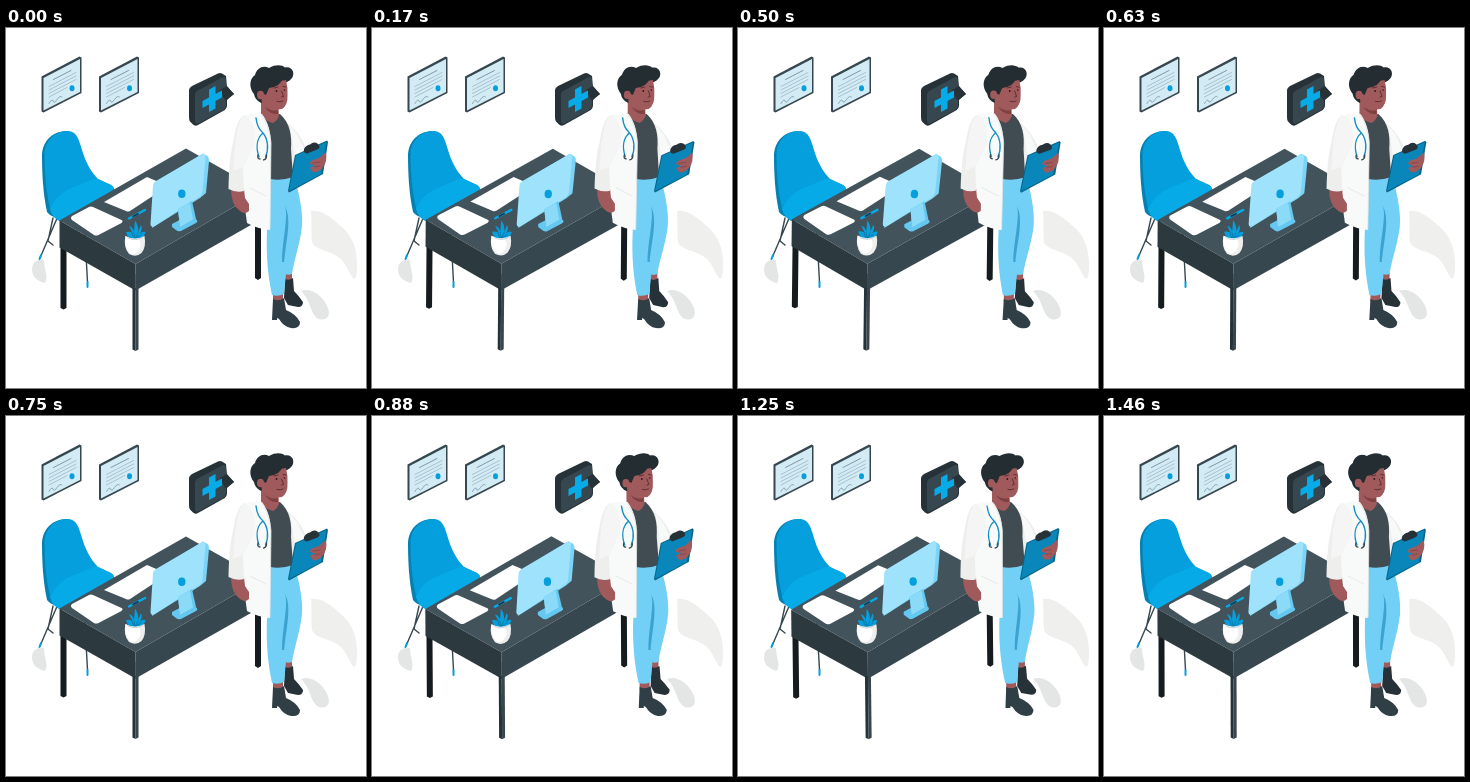
Write an HTML page that moves like this. It is 360 px wide and 360 px high and loops after 1.5 s.

```html
<!DOCTYPE html>
<html lang="en">
<head>
<meta charset="utf-8">
<title>Doctor's office</title>
<style>
  html, body { margin: 0; width: 100%; height: 100%; overflow: hidden; background: #fff; }
  svg { display: block; width: 100%; height: 100%; }
  .ink { fill: #263238; }
  .slate { fill: #37474f; }
  .blue { fill: #049fdc; }
  .pale { fill: #9ee3fb; }
  .skin { fill: #a05a5b; }
  .dusk { fill: #7f4042; }
  .shade { fill: #eeeeed; }
  .coat { fill: #f8faf9; }
  .pants { fill: #72cff5; }
  .line { fill: none; stroke-linecap: round; stroke-linejoin: round; }
</style>
</head>
<body>
<svg viewBox="0 0 360 360">
  <defs>
    <g id="diploma">
      <path class="slate" d="M35.500 48.500L73.500 28.500L75.500 29.500V65L37.500 84.500L35.500 83.500Z"/>
      <path fill="#d3ebf5" d="M37.500 50L74 31V64L37.500 82.500Z"/>
      <path class="line" stroke="#7e98a5" stroke-width="1" d="M47.500 51.500L65 42.500"/>
      <path class="line" stroke="#9db8c4" stroke-width=".8" d="M43 58.500L70 44.500M43 62L70 48M43 65.500L70 51.500M43 69L61 59.500"/>
      <path class="line" stroke="#7e98a5" stroke-width=".8" d="M43 75.500Q46 70 47 73T51 71.500T56 69"/>
      <ellipse class="blue" cx="66" cy="60.300" rx="2.500" ry="3"/>
    </g>
  </defs>

  <!-- floor shadows -->
  <path fill="#efefee" d="M305 183C316 181 327 191 337 200C347 209 351 222 351 236C351 246 350 253 347 250C342 244 340 233 331 228C321 222 309 222 306 214C305 206 306 197 305 183Z"/>
  <g fill="#e4e6e6">
    <path d="M295 263C303 259 317 266 322 280C325 289 320 293 313 291C304 287 306 274 295 263Z"/>
    <path d="M26 241C26 234 32 231 38 232C38 242 43 248 39 255C31 253 26 249 26 241Z"/>
  </g>

  <use href="#diploma"/>
  <use href="#diploma" x="57.500"/>

  <!-- medical sign -->
  <path class="ink" d="M183 62Q183 60 186 58L212 45.500Q214 44.500 216 45.500L220 48L221 59L228 66L221 72V77Q221 81 217 83L192 97Q189 98.500 187 96.500L184 93.500Q183 92 183 89Z"/>
  <path class="slate" d="M189 67Q189 64 192 62.500L216 49.500Q220 47.500 220 52V77Q220 80 217 82L193 95Q189 97 189 93Z"/>
  <path class="ink" d="M214 62L221 58L228 66L219 72Z"/>
  <path fill="#07abe8" d="M203 61.500L209.500 58V66L216 62.500V69.500L209.500 73V80.500L203 84V76.500L196.500 80V73L203 69.500Z"/>

  <!-- chair -->
  <g class="line" stroke="#37474f" stroke-width="1.400">
    <path d="M52 188L34 230M47 190L42 213L47 217M78 190L81.500 254"/>
    <path stroke="#049fdc" stroke-width="2" d="M35 227L33.500 231M81.500 254V259"/>
  </g>
  <path fill="#0580b0" d="M36 126C37 111 49 102 63 103L60 186Q48 193 41 184C37 166 36 145 36 126Z"/>
  <path class="blue" d="M38.500 126C39 112 50 102 63 103C71 104 73 112 76 122C79 132 84 143 92 151L105 157Q110 160 107 165L56 194Q46 191 44 180C40 163 38.500 145 38.500 126Z"/>
  <path fill="#06aae6" d="M44 181Q49 169 61 162L85 152Q88 150 92 151L105 157Q110 160 107 165L56 194Q46 190 44 181Z"/>

  <g id="desk">
    <path fill="#151b1e" d="M54.500 205H60.500V280L57.500 281.500L54.500 280ZM249 190H255V250L252 252L249 250Z"/>
    <path fill="#43535b" d="M53.500 192.500L180 120.500L255.500 163L129.500 236Z"/>
    <path fill="#2c393f" d="M53.500 192.500L129.500 236V262.500L53.500 219.500Z"/>
    <path class="slate" d="M129.500 236L255.500 163V191L129.500 262.500Z"/>
    <path class="slate" d="M129.500 246H132.500V321.500L129.500 323Z"/>
    <path class="ink" d="M126.500 260H129.500V323L126.500 321.500Z"/>

    <!-- papers and pen -->
    <g fill="#fff">
      <path d="M66 188L83 179Q85 178 87 179L115.500 192Q117.500 193 115.500 195L92.500 207Q90 208 88 207L66 192Q64 190 66 188Z"/>
      <path d="M98 174L141 149L162 158L124 183Q122 184 120 183Z"/>
    </g>
    <path class="line" stroke="#06aae6" stroke-width="2.400" d="M123 190.500L139 182"/>
    <path class="line" stroke="#16384d" stroke-width="1.700" d="M127 188.500L132 185.800"/>

    <!-- computer -->
    <path fill="#64c8f0" d="M166 196L183 187L191 192Q192 194 190 195L175 203Q172 204 170 202L166 199Z"/>
    <path fill="#7bd3f5" d="M148 155L197 125.500L201.500 128Q203.500 130 203 133L200 165L194 170L146 200Z"/>
    <path class="pale" d="M147 157Q147.500 155 150 153L195.500 126.500Q200 124.500 199.500 129L196.500 164Q196 167 193.500 169L148.500 198Q144.500 200 144.500 196Z"/>
    <ellipse class="blue" cx="175.800" cy="165.800" rx="3.700" ry="4.300"/>
    <path fill="#64c8f0" d="M172 181L186 173L190 191L174 200Z"/>
    <path fill="#8bdaf8" d="M172 181L184 174.500L187 191.500L174 199Z"/>

    <!-- plant -->
    <path class="blue" d="M120 204Q125 203 127 206L123 198Q127 199 128 204L129 192.500Q133 198 132 204L135 197Q137 200 134 206Q136 203 139.500 204Q138 211 131 213Q122 213 120 204Z"/>
    <path class="line" stroke="#0475a5" stroke-width=".8" d="M128 205L129 211L132 205M126 206L128 211L135 207"/>
    <path class="shade" d="M119.500 208Q129 213 138.500 208Q140.500 219 135.500 225Q130 230 123 226Q117 219 119.500 208Z"/>
    <path fill="#fff" d="M119.500 208Q127 213 133 211Q137 218 131 224Q127 228 123 224Q118 217 119.500 208Z"/>
    <path class="line" stroke="#b9c4c9" stroke-width=".7" d="M122 210Q130 214 137 209"/>
  </g>

  <g id="doctor">
    <!-- legs -->
    <path class="skin" d="M267 262H277V274H267ZM279 242H286V254H279Z"/>
    <path class="ink" d="M279 251Q283 253 287 250L288 263Q293 268 297 274Q297 279 292 279L282 277L278 270Z"/>
    <path fill="#303e45" d="M267 271Q273 274 278 270L280 282Q290 286 294 294Q294 301 285 300Q278 299 273 291L271 290V292H266Z"/>
    <path class="pants" d="M264 148L261 203C260 228 262 248 266 267Q272 269 278 266C280 246 283 220 283 195L277 155Z"/>
    <path fill="#3ba3cf" d="M270 156C277 169 281 178 280 190C279 206 276 218 276 234L279 234L284 190L276 156Z"/>
    <path class="pants" d="M266 148H288C294 168 297 185 296 198C294 216 288 232 286 246Q281 248 278 245C277 225 284 205 282 188C281 176 271 169 268 157Z"/>

    <!-- coat and shirt -->
    <path class="shade" d="M278 93C288 99 296 108 302 125L289 131L287 150L279 121Z"/>
    <path class="coat" d="M284 98L291 106L299 123L289 130Z"/>
    <path fill="#414c52" d="M256 89L274 86C284 95 286 107 285 121L287 149Q276 153 264 151Z"/>
    <path class="skin" d="M255 73H272L273 88Q271 93 267 95Q259 93 255 87Z"/>
    <path class="dusk" d="M259 79Q266 84 272 82V86Q264 87 259 79Z"/>
    <path class="coat" d="M237 88Q247 84 256 86C262 94 264.500 103 265 115L264 202Q252 201 241 195L235 151Z"/>
    <path class="line" stroke="#e3e5e4" stroke-width=".8" d="M256 87C261 95 264 104 265 115L264 201M244 160L260 168"/>
    <path class="skin" d="M225 161H238L239 170L243 176V183Q239 187 234 183Q225 177 225 161Z"/>
    <path class="shade" d="M238 87C231 91 229 104 227 115Q223 130 222.500 161Q230 165 238 163L237 139L248 116Q250 94 238 87Z"/>
    <path fill="#f4f5f4" d="M238 87C232 93 231 105 229 116L227 143L237 139L248 116Q250 94 238 87Z"/>
    <path class="line" stroke="#188fc0" stroke-width="1.400" d="M250 90C251 98 253 101 257 105C262 111 263 121 259.500 129M257 105C251 110 249.500 119 253 129"/>
    <path class="line" stroke="#37474f" stroke-width="1.300" d="M252 127Q251 131 254 131M260.500 127Q261 131 257.500 132"/>

    <!-- clipboard -->
    <path fill="#056488" d="M289 127L321 112.500L322 114L317 146L283 164.500L282 163Z"/>
    <path fill="#0987ba" d="M290 127.500L320.500 114L315 146L283 163Z"/>
    <path class="ink" d="M298 121Q300 117 304 116.500Q308 113 312 116Q316 120 310 122L301 125.500Q297 125 298 121Z"/>
    <path class="skin" d="M320 124Q321.500 134 317 139Q313 145 307 144L304 140Q306 138 310 138L304 136Q304 133 307 132L313 130Z"/>
    <path class="line" stroke="#7f4042" stroke-width=".7" d="M307 135L314 134M309 139L314 138"/>

    <!-- head -->
    <path fill="#232d32" d="M248 66C243 60 243 51 249 47C251 40 257 37 263 40C270 36 276 37 279 39.500C287 38 289 46 286 50C283 54 279 55 276 55L262 72L255 75Q249 72 248 66Z"/>
    <path class="skin" d="M260 57Q268 59 274 53L280 52Q282 60 281.500 67Q282 77 276 81Q266 83 256 76L255 66Z"/>
    <path fill="#232d32" d="M254 54L277 50Q274 59 263 60L260 67L256 65Z"/>
    <ellipse class="skin" cx="254.500" cy="67" rx="3.500" ry="4.200"/>
    <circle fill="#2a1b1d" cx="270.500" cy="63" r=".9"/>
    <circle fill="#2a1b1d" cx="278.500" cy="62" r=".8"/>
    <path class="line" stroke="#4f2629" stroke-width=".8" d="M268 60L272 59M277 58.500L280 59M275.500 63L277.500 68.500L275.500 69M271 73.500Q274 74.500 277 73"/>
  </g>
</svg>
<script>
  const LOOP = 1500;
  // Each group turns about the middle of its own box
  const groups = [
    { el: document.getElementById("desk"), x: 155, y: 222 },
    { el: document.getElementById("doctor"), x: 272, y: 168 }
  ];

  // Linear sway: 0 -> 1 -> -1 -> 0 degrees
  function sway(p) {
    if (p < 0.25) return 4 * p;
    return p < 0.75 ? 2 - 4 * p : 4 * p - 4;
  }

  function draw(now) {
    const angle = sway((now % LOOP) / LOOP).toFixed(4);
    for (const { el, x, y } of groups) {
      el.setAttribute("transform", `rotate(${angle} ${x} ${y})`);
    }
    requestAnimationFrame(draw);
  }

  draw(performance.now());
</script>
</body>
</html>
```
